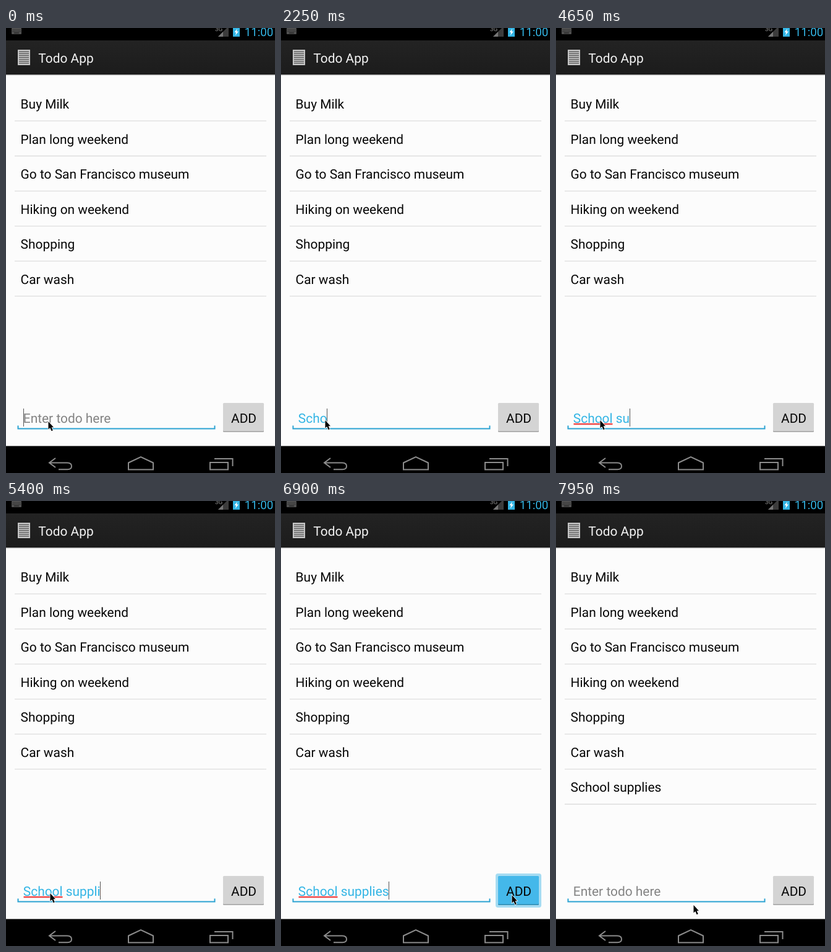
An HTML page with a canvas that plays this animation: 435 by 718 pixels, repeating every 8 s.

```html
<!DOCTYPE html>
<html lang="en">
<head>
<meta charset="utf-8">
<title>Todo App</title>
<style>
html, body { margin: 0; width: 100%; height: 100%; overflow: hidden; background: #fcfcfc; }
canvas { display: block; width: 435px; height: 718px; }
</style>
</head>
<body>
<canvas></canvas>
<script>
const W = 435, H = 718, LOOP = 8000, STEP = 150, BLINK = 450;
const SPELLED = 3300, PRESSED = 6900, ADDED = 7200;
const BLUE = '#33b5e5', INK = '#060606', GRAY = '#8c8c8c';

const canvas = document.querySelector('canvas');
const ctx = canvas.getContext('2d');
const dpr = window.devicePixelRatio || 1;
canvas.width = W * dpr;
canvas.height = H * dpr;

const items = ['Buy Milk', 'Plan long weekend', 'Go to San Francisco museum',
  'Hiking on weekend', 'Shopping', 'Car wash'];

// Bursts of typing: letters, time of the first one, gap between them.
const bursts = [['Sch', 1050, 300], ['ool', 2250, 220], [' ', 3150, 0],
  ['s', 4350, 0], ['uppl', 4650, 150], ['ies', 5400, 150]];
const entry = bursts.map(b => b[0]).join('');
const snap = t => Math.round(t / STEP) * STEP;
const keyTimes = bursts.flatMap(([letters, at, gap]) =>
  [...letters].map((_, i) => snap(at + i * gap)));

// Every edit or touch restarts the caret's blink.
const wakes = [-STEP, ...keyTimes, SPELLED, PRESSED, ADDED];

function caretOn(t) {
  const last = Math.max(...wakes.filter(k => k <= t));
  return Math.floor((t - last) / BLINK) % 2 === 0;
}

// Pointer strokes: start, end, target point, bow of the path.
const moves = [
  { from: 0, to: 450, x: 71, y: 632, bow: 0 },
  { from: 5700, to: 6600, x: 373, y: 635, bow: 8 },
  { from: 7500, to: 7950, x: 222, y: 651, bow: -93 }
];

function pointerAt(t) {
  let x = 68, y = 634;
  for (const m of moves) {
    const p = Math.min(1, Math.max(0, (t - m.from) / (m.to - m.from)));
    const eased = 1 - (1 - p) ** 3;
    x += (m.x - x) * eased;
    y += (m.y - y) * eased + m.bow * Math.sin(Math.PI * p);
  }
  return [x, y];
}

function box(color, x, y, w, h, r = 0) {
  ctx.fillStyle = color;
  ctx.beginPath();
  ctx.roundRect(x, y, w, h, r);
  ctx.fill();
}

function text(str, x, y, color, size = 20.9) {
  ctx.font = size + 'px Roboto, sans-serif';
  ctx.fillStyle = color;
  ctx.fillText(str, x, y);
}

function stroke(d, color, width) {
  ctx.strokeStyle = color;
  ctx.lineWidth = width;
  ctx.stroke(new Path2D(d));
}

function fill(d, color) {
  ctx.fillStyle = color;
  ctx.fill(new Path2D(d));
}

function statusBar() {
  box('#000', 0, 0, W, 20);
  box('#505050', 9, 0, 16, 10, 1);
  for (let i = 0; i < 12; i++) box('#111', 10.5 + i % 6 * 2.4, i < 6 ? 2.5 : 5, 1, 1);
  box('#111', 13, 7.5, 8, 1);
  text('3G', 338, 5, GRAY, 10);
  fill('M343 14L360 -3V14Z', '#3c3c3c');
  fill('M343 14L351 6V14Z', '#777');
  box(BLUE, 367, -1, 11, 15);
  fill('M374 1L369.5 7H372L371 12L376 5.5H373Z', '#fff');
  text('11:00', 385.7, 13, BLUE, 18.7);
}

function actionBar() {
  const shade = ctx.createLinearGradient(0, 20, 0, 75);
  shade.addColorStop(0, '#232323');
  shade.addColorStop(1, '#1c1c1c');
  box(shade, 0, 20, W, 55);
  box('#a5a5a5', 0, 75, W, 1);
  box('#e2e2e2', 0, 76, W, 1);
  box('#c4c4c4', 19, 35, 20, 25);
  for (let i = 0; i < 7; i++) box('#4a4a4a', 21, 37.5 + i * 3.1, 16, 1.2);
  text('Todo App', 52.3, 56, '#f3f3f3');
}

function navBar() {
  box('#000', 0, 675, W, 43);
  box('#777', 0, 674, W, 1);
  stroke('M80 694L70 701.5L80 709M71 701.5H99Q106 701.5 106 707T99 712.3H85', GRAY, 2);
  stroke('M198 712.5V701.5L218 692L238 701.5V712.5Z', GRAY, 2);
  stroke('M330 701H359V712.5H330ZM337 695H366.5V707', GRAY, 2);
}

function list(t) {
  const shown = t < ADDED ? items : [...items, entry];
  shown.forEach((item, i) => {
    const y = i * 56.55;
    text(item, 23.6, 130 + y, INK);
    box('#dedede', 14, 149.3 + y, 407, 1.3);
  });
}

function field(t) {
  const value = t < ADDED ? entry.slice(0, keyTimes.filter(k => k <= t).length) : '';
  stroke('M19.5 641.5V646.4H337.5V641.5', '#2ca3d3', 2);
  text(value || 'Enter todo here', 27.8, 637, value ? BLUE : '#838383');
  if (value && t >= SPELLED) box('#f04848', 28.5, 637.7, 63, 2.5);
  if (caretOn(t)) box('#555', Math.floor(28 + ctx.measureText(value).width), 614, 1, 29);
}

function button(down) {
  if (down) box('#a6dcf2', 347, 601, 74, 55, 4);
  box(down ? '#3189ae' : '#a3a3a3', 351, 606, 66, 46, 1.5);
  box(down ? '#44b8ea' : '#d4d4d4', 351, 605, 66, 45.5, 1.5);
  text('ADD', 364, 637, INK);
}

function pointer(t) {
  const arrow = 'M.5 1V13.5L3.3 11L5.6 16.2L7.8 15.2L5.6 10.2H9Z';
  ctx.translate(...pointerAt(t));
  stroke(arrow, '#fff', 1.4);
  fill(arrow, '#000');
}

function draw(t) {
  ctx.setTransform(dpr, 0, 0, dpr, 0, 0);
  ctx.textRendering = 'geometricPrecision';
  box('#fcfcfc', 0, 0, W, H);
  statusBar();
  actionBar();
  list(t);
  field(t);
  button(t >= PRESSED && t < ADDED);
  navBar();
  pointer(t);
}

// The screen refreshes in fixed steps.
const start = performance.now();
function tick() {
  const t = (performance.now() - start) % LOOP;
  draw(Math.floor(t / STEP) * STEP);
  requestAnimationFrame(tick);
}
tick();
</script>
</body>
</html>
```
